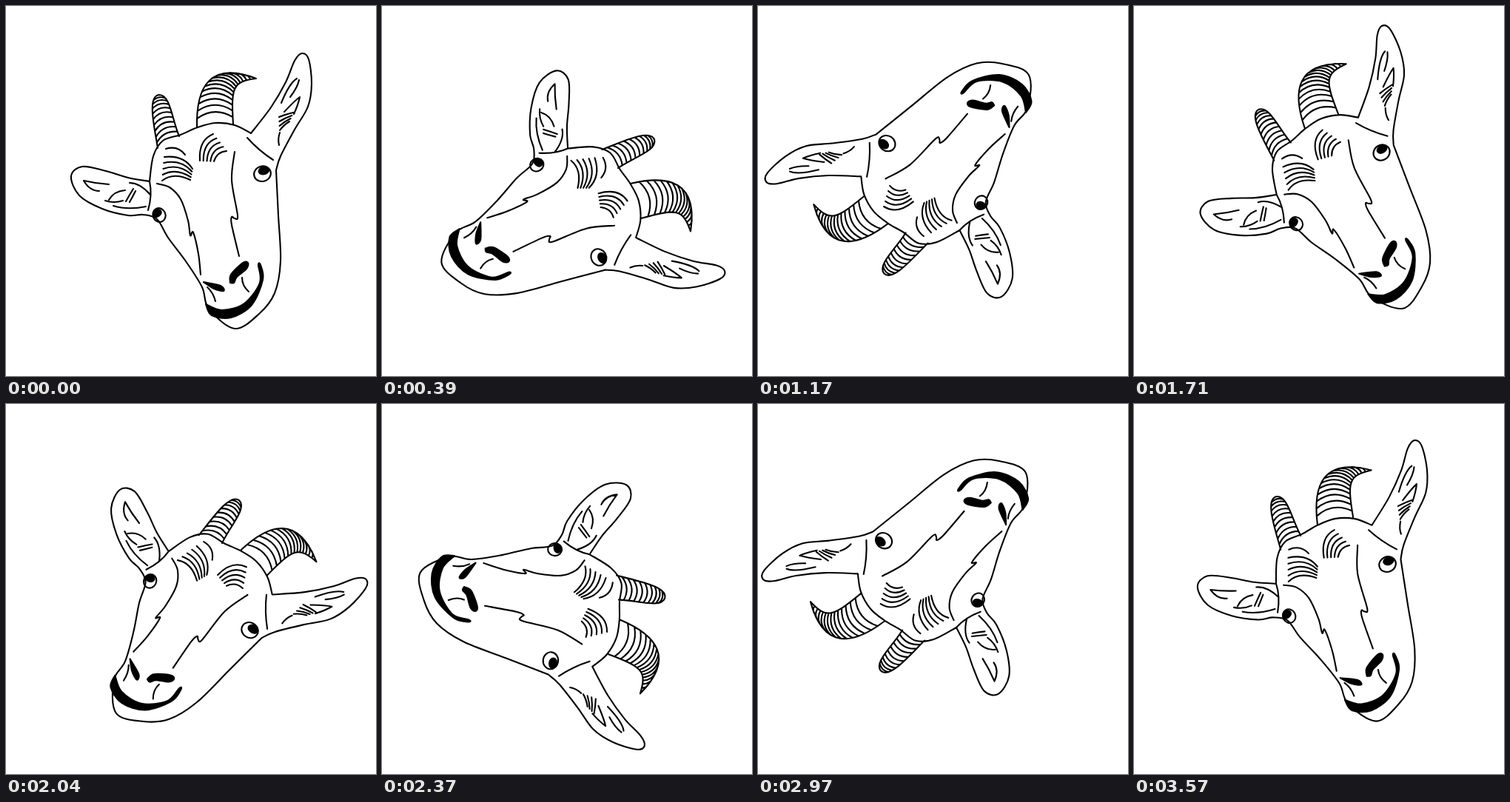
Recreate the animation shown at these times as an HTML page with a canvas. Size 500 px wide and 500 px high, loop 3600 ms.

```html
<!DOCTYPE html>
<html lang="en">
<head>
<meta charset="utf-8">
<title>Spinning goat</title>
<style>
html, body { margin: 0; width: 100%; height: 100%; overflow: hidden; background: #fff; }
canvas { display: block; }
</style>
</head>
<body>
<canvas id="stage" width="500" height="500"></canvas>
<script>
const ctx = document.getElementById('stage').getContext('2d');
const LOOP = 3600, STEP = 30, TURN_PER_STEP = Math.PI / 30;
const lines = new Path2D(), solids = new Path2D();
const mix = (a, b, t) => a.map((v, i) => v + (b[i] - v) * t);

// Smooth curve through "x,y x,y ..." points.
function curve(text, path = lines) {
  const p = text.split(' ').map(s => s.split(',').map(Number));
  const handle = (i, dir) => {
    const before = p[Math.max(0, i - 1)], after = p[Math.min(p.length - 1, i + 1)];
    return p[i].map((v, k) => v + dir * (after[k] - before[k]) / 6);
  };
  path.moveTo(...p[0]);
  for (let i = 1; i < p.length; i++)
    path.bezierCurveTo(...handle(i - 1, 1), ...handle(i, -1), ...p[i]);
}

function arc(x1, y1, cx, cy, x2, y2) {
  lines.moveTo(x1, y1);
  lines.quadraticCurveTo(cx, cy, x2, y2);
}

// A family of arcs fading from one shape into another.
function fan(count, first, last) {
  for (let i = 0; i < count; i++) arc(...mix(first, last, i / (count - 1)));
}

function cubicPoint(p, t) {
  while (p.length > 1) p = p.slice(1).map((q, i) => mix(p[i], q, t));
  return p[0];
}

// Two cubic edges meet at the tip; bowed rings join them at equal steps.
function horn(left, right, rings, step) {
  for (const [start, ...rest] of [left, right]) {
    lines.moveTo(...start);
    lines.bezierCurveTo(...rest.flat());
  }
  for (let k = 1; k <= rings; k++) {
    const a = cubicPoint(left, k * step), b = cubicPoint(right, k * step);
    const [mx, my] = mix(a, b, .5), bow = .33;
    arc(...a, mx + (b[1] - a[1]) * bow, my - (b[0] - a[0]) * bow, ...b);
  }
}

// Outline: left ear and cheek, right cheek, right ear, crown
curve('194,237 165,232 135,223 103,217 88,230 99,256 130,274 165,283 185,282 204,288 219,313 243,345 265,380 274,409 309,436 342,416 363,388 371,345 368,283 365,222');
curve('365,222 371,203 390,167 408,136 413,105 409,72 400,64 390,74 378,103 358,137 331,172');
curve('331,172 309,161 283,158 259,164 236,174 212,182 199,203 194,237');

horn([[205, 192], [201, 165], [190, 122], [207, 120]],
     [[234, 176], [224, 152], [222, 120], [207, 120]], 9, .085);
horn([[258, 163], [257, 110], [275, 74], [338, 98]],
     [[307, 160], [304, 110], [306, 102], [338, 98]], 13, .07);

// Forehead creases
arc(216, 193, 232, 188, 242, 201);
fan(5, [214, 204, 240, 201, 252, 220], [211, 236, 226, 224, 249, 235]);
fan(5, [280, 173, 260, 181, 262, 209], [298, 196, 285, 197, 281, 210]);

// Left ear folds
arc(194, 237, 198, 255, 192, 276);
arc(139, 241, 122, 240, 105, 236);
arc(105, 236, 113, 250, 126, 250);
fan(2, [134, 263, 146, 267, 158, 263], [145, 270, 165, 276, 189, 271]);
arc(139, 262, 146, 250, 161, 249);
fan(2, [162, 264, 167, 255, 172, 247], [167, 265, 171, 258, 175, 250]);
arc(167, 239, 181, 239, 195, 255);

// Right ear folds
arc(393, 98, 383, 104, 372, 131);
fan(2, [396, 100, 394, 110, 384, 123], [397, 123, 390, 128, 376, 143]);
arc(397, 123, 395, 133, 389, 146);
fan(4, [369, 150, 379, 146, 388, 144], [370, 168, 375, 161, 383, 156]);
arc(370, 171, 367, 180, 369, 188);

// Brow, muzzle and nose lines
arc(326, 178, 341, 195, 361, 208);
curve('204,240 221,245 236,261 246,290 249,310 253,306 260,335 263,363');
curve('309,197 305,235 313,283 309,287 305,285 305,296 315,338');
arc(272, 380, 280, 387, 283, 399);
arc(319, 367, 319, 378, 328, 386);

// Nostrils and mouth
curve('267,373 290,378 294,385 281,382 267,373', solids);
curve('303,374 304,363 320,347 327,347 325,355 312,366 308,374 303,374', solids);
curve('270,403 292,411 322,402 343,374 341,350 344,350 347,370 332,404 304,421 278,418 270,403', solids);

function eye(x, y, rx, ry, tilt, px, py) {
  const white = new Path2D(), pupil = new Path2D();
  white.ellipse(x, y, rx, ry, tilt, 0, 7);
  pupil.ellipse(px, py, 8, 6, tilt, 0, 7);
  ctx.save();
  ctx.clip(white);
  ctx.fill(pupil);
  ctx.restore();
  ctx.stroke(white);
}

function frame(now) {
  const step = Math.floor(now % LOOP / STEP), t = step * STEP;
  // The pivot sways slightly to the left during the second turn.
  const sway = Math.sin(Math.PI * Math.max(0, t - 1710) / 1990);
  ctx.resetTransform();
  ctx.clearRect(0, 0, 500, 500);
  ctx.translate(250 - 4.8 * sway, 250 - sway);
  ctx.rotate(step * TURN_PER_STEP);
  ctx.translate(-250, -250);
  ctx.lineWidth = 2.1;
  ctx.lineCap = ctx.lineJoin = 'round';
  ctx.stroke(lines);
  ctx.fill(solids);
  ctx.stroke(solids);
  eye(346.5, 226.7, 11.5, 10.2, -.3, 348.5, 222.3);
  eye(207, 282.5, 8.5, 9.5, -.4, 203, 280);
}

const start = performance.now();
(function tick() {
  frame(performance.now() - start);
  requestAnimationFrame(tick);
})();
</script>
</body>
</html>
```
